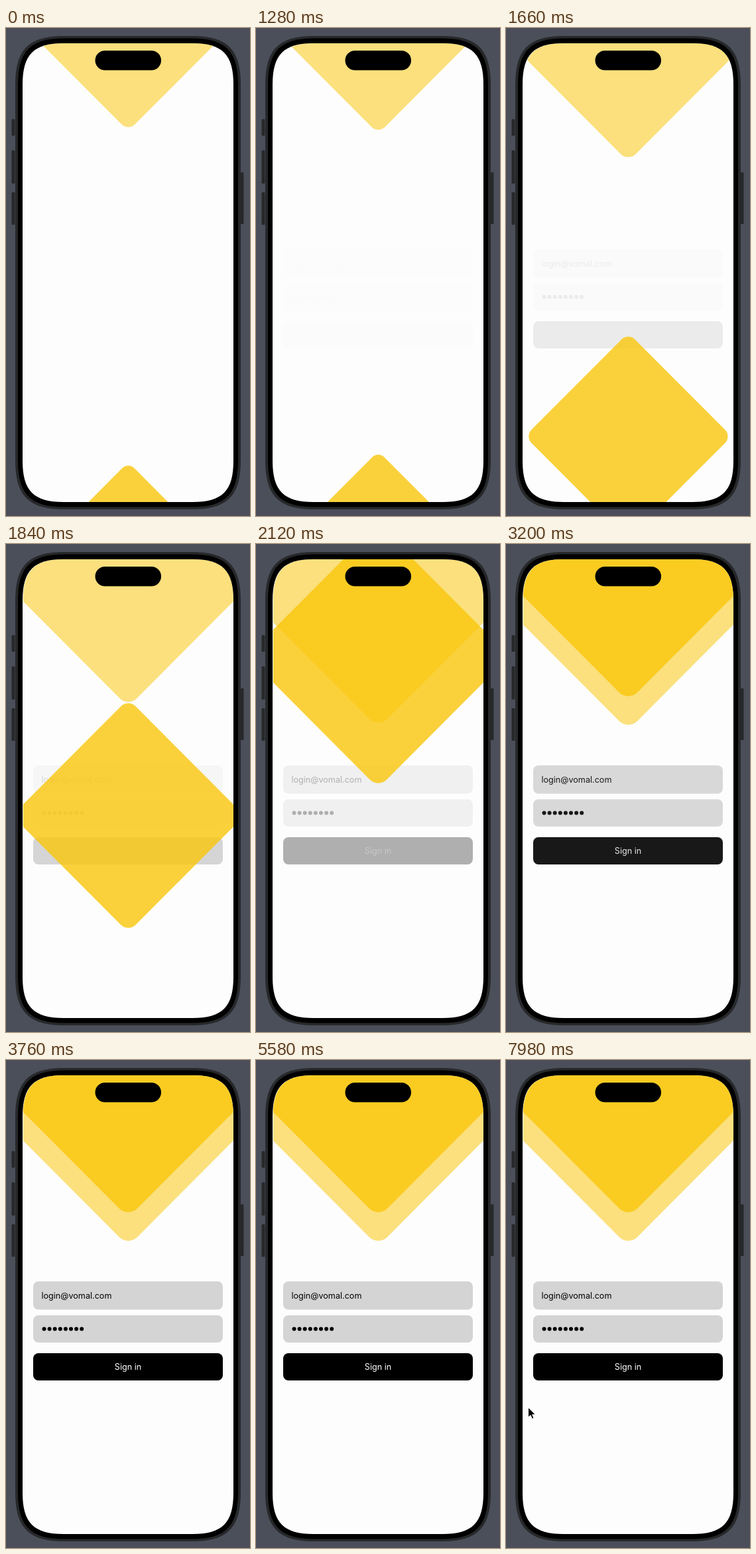
Recreate the animation shown at these times as an HTML page. Size 368 by 734 pixels, loop 8000 ms.

```html
<!DOCTYPE html>
<html lang="en">
<head>
<meta charset="utf-8">
<title>Sign in intro</title>
<style>
  html, body { margin: 0; width: 100%; height: 100%; overflow: hidden; background: #4a4f5a; }
  svg { display: block; }
  text { font: 12.6px Inter, "Liberation Sans", sans-serif; }
  .rim { fill: #27282a; }
  .field { fill: #d4d4d5; }
  .diamond { fill: #fac70c; }
</style>
</head>
<body>
<svg width="368" height="734" viewBox="0 0 368 734">
  <defs>
    <clipPath id="view"><path data-box="25.8 23 317.2 690 62"/></clipPath>
  </defs>

  <g class="rim">
    <rect x="8.5" y="137" width="5" height="25" rx="1.5"/>
    <rect x="8.5" y="184" width="5" height="50" rx="1.5"/>
    <rect x="8.5" y="247" width="5" height="49" rx="1.5"/>
    <rect x="354" y="217" width="4.5" height="78" rx="1.5"/>
    <path data-box="14 12 340 712 74"/>
  </g>
  <path data-box="18 15.5 332 705 70"/>
  <path data-box="25 23 318 690 62" fill="#fdfdfd"/>

  <g id="form" opacity="0">
    <rect class="field" x="41" y="333" width="286" height="42.5" rx="8"/>
    <rect class="field" x="41" y="384" width="286" height="41" rx="8"/>
    <rect x="41" y="441" width="286" height="41" rx="8"/>
    <text x="53.5" y="359">login@vomal.com</text>
    <path d="M57.5 404.5h57.2" stroke="#000" stroke-width="6" stroke-linecap="round" stroke-dasharray="0 8.1"/>
    <text id="label" x="184" y="466" text-anchor="middle" fill="#fff">Sign in</text>
  </g>

  <g clip-path="url(#view)">
    <rect id="light" class="diamond" opacity=".53" x="-70.7" y="-70.7" width="141.4" height="141.4" rx="9"/>
    <rect id="dark" class="diamond" opacity=".8" x="-70.7" y="-70.7" width="141.4" height="141.4" rx="9"/>
  </g>
  <rect x="134.5" y="34" width="99.5" height="29.6" rx="14.8"/>

  <path id="cursor" visibility="hidden" d="M0 0v15l3.5-3.2 2.4 5.4 2.6-1.1-2.4-5.3h4.7z"
        stroke="#fff" stroke-width="1"/>
</svg>

<script>
const LOOP = 8000, START = 1240;
const $ = id => document.getElementById(id);
const form = $('form'), label = $('label'), cursor = $('cursor');

// Half diagonal and centre height, at rest before and after; span in ticks.
const diamonds = [
  { node: $('light'), size: [155, 212], y: [0, 68], span: 23.7 },
  { node: $('dark'), size: [139, 212], y: [792, 25], span: 30 }
];

// Rectangle whose corners curve continuously over length r.
function squircle([x, y, w, h, r]) {
  const s = r * 0.271, l = r - s, across = w - 2 * r, down = h - 2 * r;
  return `M${x} ${y + r}c0 ${-l} ${s} ${-r} ${r} ${-r}h${across}` +
    `c${l} 0 ${r} ${s} ${r} ${r}v${down}` +
    `c0 ${l} ${-s} ${r} ${-r} ${r}h${-across}` +
    `c${-l} 0 ${-r} ${-s} ${-r} ${-r}z`;
}
document.querySelectorAll('[data-box]').forEach(n =>
  n.setAttribute('d', squircle(n.dataset.box.split(' ').map(Number))));

const lerp = ([a, b], p) => a + (b - a) * p;

// cubic-bezier(.42, 0, .58, 1)
function easeInOut(x) {
  if (x <= 0) return 0;
  if (x >= 1) return 1;
  let lo = 0, hi = 1, u;
  for (let i = 0; i < 24; i++) {
    u = (lo + hi) / 2;
    const bx = 1.26 * u * (1 - u) ** 2 + 1.74 * u * u * (1 - u) + u ** 3;
    if (bx < x) lo = u; else hi = u;
  }
  return u * u * (3 - 2 * u);
}

// Three ticks every 140 ms, held for 20, 20 and 100 ms.
function tickAt(t) {
  if (t < START) return 0;
  const rest = (t - START) % 140;
  return 3 * Math.floor((t - START) / 140) + (rest < 20 ? 1 : rest < 40 ? 2 : 3);
}

function draw(t) {
  const tick = tickAt(t);
  for (const { node, size, y, span } of diamonds) {
    const p = easeInOut(tick / span);
    node.setAttribute('transform',
      `translate(184.4 ${lerp(y, p)}) scale(${lerp(size, p) / 100}) rotate(45)`);
  }
  const fade = easeInOut(tick / 55);
  form.setAttribute('opacity', fade);
  label.setAttribute('opacity', fade);
  cursor.setAttribute('visibility', t >= 7960 ? 'visible' : 'hidden');
  cursor.setAttribute('transform', t >= 7980 ? 'translate(33.5 522.5)' : 'translate(1 557)');
}

const began = performance.now();
function loop() {
  draw((performance.now() - began) % LOOP);
  requestAnimationFrame(loop);
}
loop();
</script>
</body>
</html>
```
